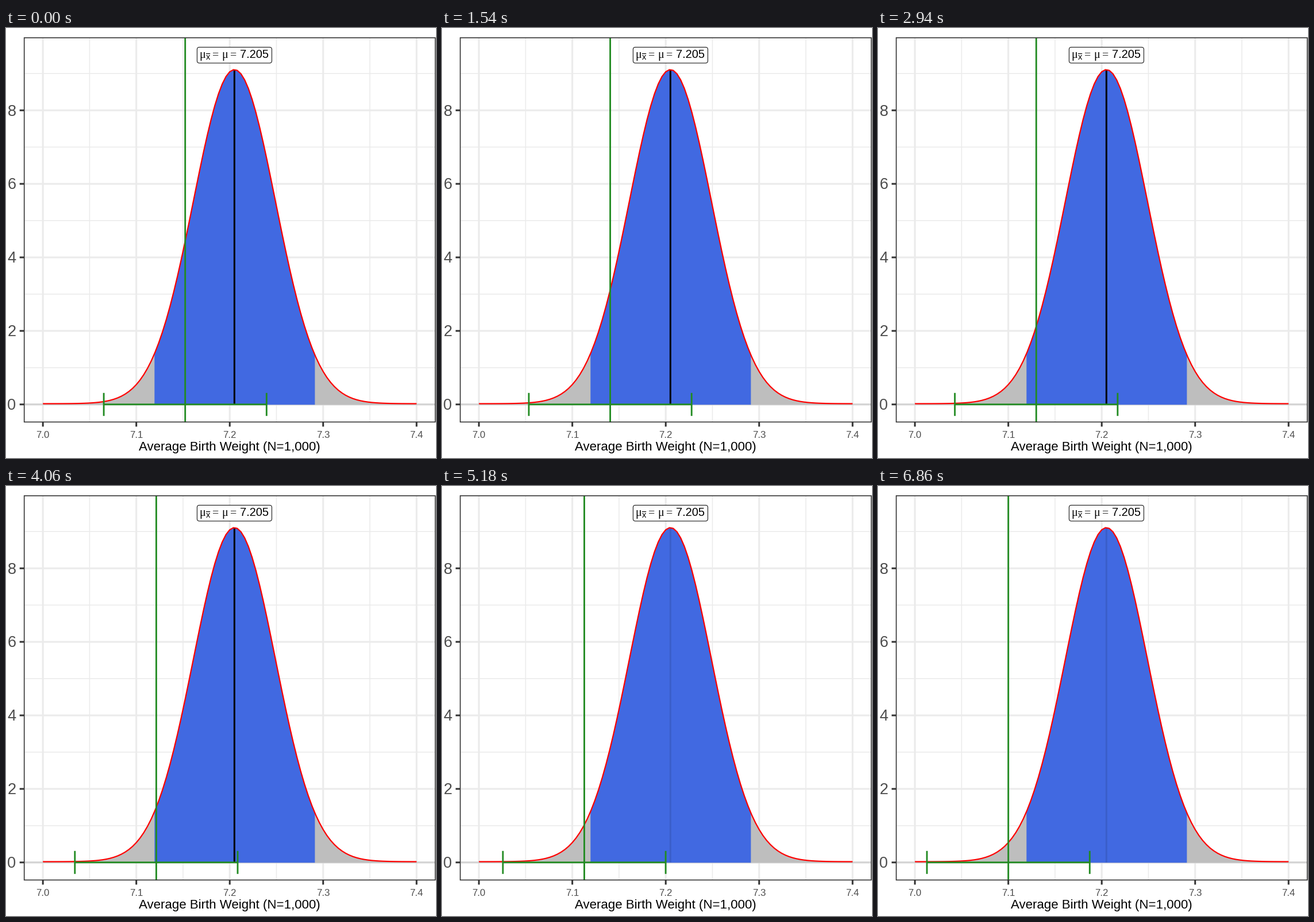
Recreate the animation shown at these times as a matplotlib script. Size 748 px wide and 748 px high, loop 7000 ms.

```python
import numpy as np
import matplotlib.pyplot as plt
from matplotlib.animation import FuncAnimation
from matplotlib.patches import FancyBboxPatch, Rectangle

SIZE, DPI = 748, 64          # 64 dpi keeps the figure size exact in binary
PT = 72 / DPI                # points per pixel
FRAMES, INTERVAL = 50, 140

LEFT, RIGHT, TOP, BOTTOM = 31.7, 746.7, 17.0, 685.4
MEAN, SD, LIFT = 7.205, 0.0439, 0.02
HALF_CI = 0.08713
START, END = 7.1523, 7.1     # sample mean at both ends of the sweep

GRID, DARK, LABEL = "#ebebeb", "#333333", "#4d4d4d"
GREEN, BLUE = "#228b22", "#4169e1"


def px(x):
    return 64.2 + (np.asarray(x) - 7.0) * 1625


def py(y):
    return 654.8 - np.asarray(y) * 63.95


def density(x):
    z = (np.asarray(x) - MEAN) / SD
    return np.exp(-z * z / 2) / (SD * np.sqrt(2 * np.pi)) + LIFT


fig = plt.figure(figsize=(SIZE / DPI, SIZE / DPI), dpi=DPI, facecolor="white")
ax = fig.add_axes([0, 0, 1, 1])
ax.set_xlim(0, SIZE)
ax.set_ylim(SIZE, 0)
ax.axis("off")


def line(xs, ys, color, width, z, **kw):
    item, = ax.plot(xs, ys, color=color, lw=width * PT, zorder=z, snap=False,
                    solid_capstyle="butt", **kw)
    return item


def text(x, y, s, size, color="black", ha="center", font="Liberation Sans"):
    ax.text(x, y, s, fontsize=size * PT, color=color, ha=ha, va="baseline",
            family=font, zorder=10)


# Grid
for i in range(4):
    line([px(7.05 + i / 10)] * 2, [TOP, BOTTOM], GRID, 1.5, 1)
for v in range(1, 10, 2):
    line([LEFT, RIGHT], [py(v)] * 2, GRID, 1.5, 1)
for v in range(0, 10, 2):
    line([LEFT, RIGHT], [py(v)] * 2, GRID, 3, 1)
for i in range(5):
    line([px(7 + i / 10)] * 2, [TOP, BOTTOM], GRID, 3, 1)
line([LEFT, RIGHT], [py(0)] * 2, "#d3d3d3", 3, 2)

# Density curve with its central 95 % region
xs = np.linspace(7.0, 7.4, 101)
lo, hi = MEAN - 1.96 * 0.0438, MEAN + 1.96 * 0.0438
mid = np.concatenate([[lo], xs[(xs > lo) & (xs < hi)], [hi]])
for pts, color, z in ((xs, "#bebebe", 3), (mid, BLUE, 4)):
    ax.fill_between(px(pts), py(density(pts)), py(0), color=color, lw=0,
                    zorder=z, snap=False)
line(px(xs), py(density(xs)), "red", 2.2, 6, solid_joinstyle="round")
mean_line = line([px(MEAN)] * 2, [py(0), py(9.09)], "black", 3, 5)

# Panel border, ticks and axis text
ax.add_patch(Rectangle((LEFT, TOP), RIGHT - LEFT, BOTTOM - TOP, fill=False,
                       ec=DARK, lw=1.6 * PT, zorder=9, snap=False))
for v in range(0, 10, 2):
    line([LEFT - 8, LEFT], [py(v)] * 2, DARK, 3, 8)
    text(17.6, py(v) + 9.4, str(v), 27.3, LABEL, "right")
for i in range(5):
    x = px(7 + i / 10)
    line([x, x], [BOTTOM, BOTTOM + 8], DARK, 3, 8)
    text(x, 713.2, f"{7 + i / 10:.1f}", 16.7, LABEL)
text(389.2, 734.5, "Average Birth Weight (N=1,000)", 22.2)

# Mean label
ax.add_patch(FancyBboxPatch((332.4, 33.4), 130, 27.6, fc="white", ec="black",
                            boxstyle="round,pad=0,rounding_size=4",
                            lw=1.0 * PT, zorder=9))
for x, s in ((336.6, "μ"), (358.6, "="), (375.4, "μ"), (390.4, "=")):
    text(x, 52.2, s, 20, ha="left", font="Liberation Serif")
text(347.8, 55.4, "x", 14.5, ha="left")
line([348, 355.2], [44.6, 44.6], "black", 1.2, 10)
text(407, 52.2, "7.205", 20, ha="left")

# Moving sample mean and its confidence interval
center = line([], [], GREEN, 2.85, 7)
bar = line([], [], GREEN, 2.85, 7)
caps = [line([], [], GREEN, 2.85, 7) for _ in range(2)]


def update(i):
    m = START + (END - START) * i / (FRAMES - 1)
    ends = px([m - HALF_CI, m + HALF_CI])
    center.set_data([px(m)] * 2, [TOP, BOTTOM + 0.7])
    bar.set_data(ends, [py(0)] * 2)
    for cap, x in zip(caps, ends):
        cap.set_data([x, x], [py(0) - 20, py(0) + 20])
    # The mean fades as soon as the interval no longer covers it
    mean_line.set_alpha(1 if m + HALF_CI >= MEAN else 0.1)
    return [center, bar, *caps, mean_line]


anim = FuncAnimation(fig, update, frames=FRAMES, interval=INTERVAL,
                     repeat=True, repeat_delay=0, blit=False)
plt.show()
```
